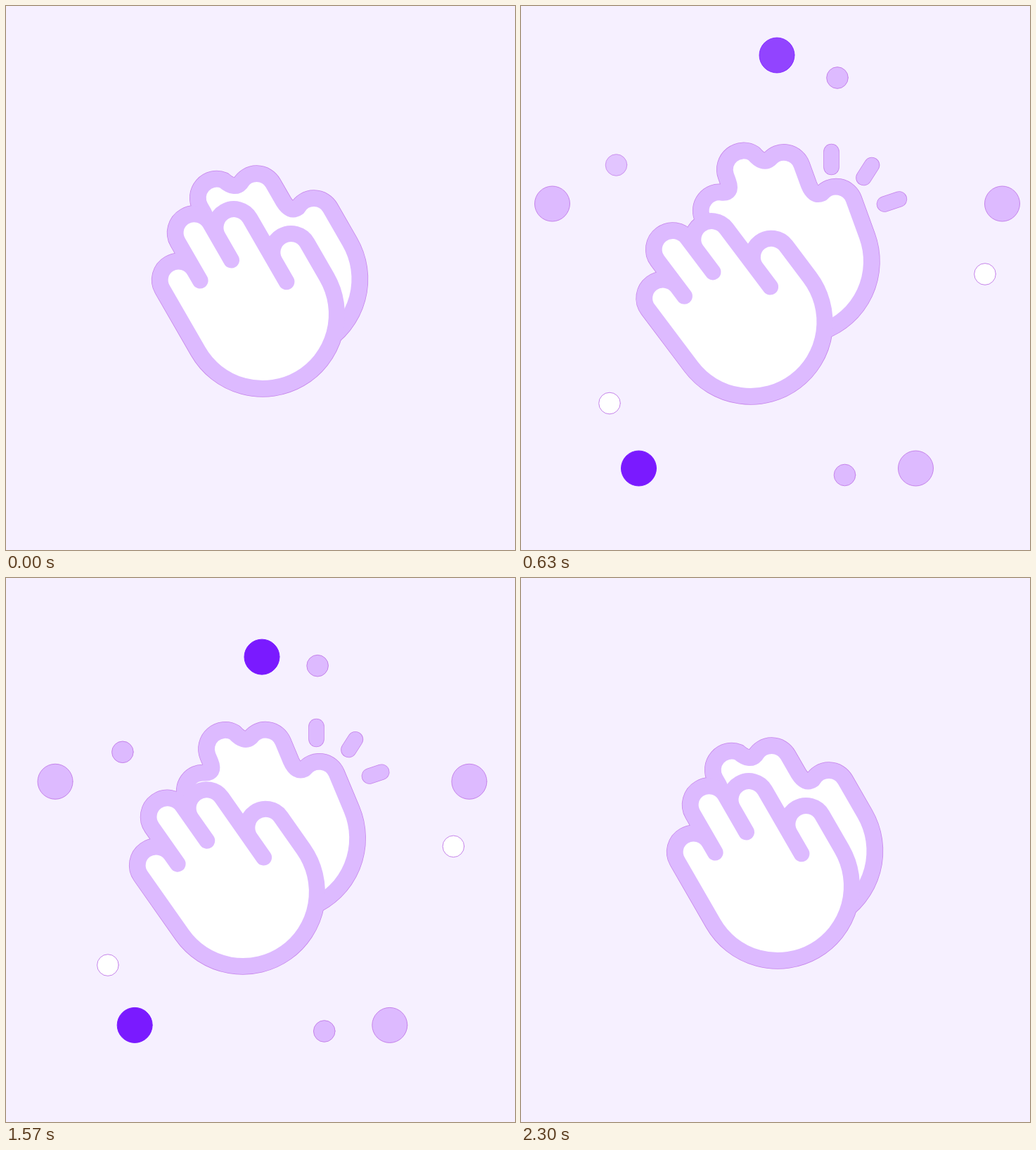
Write an HTML page with a canvas that moves like this. It is 724x773 px and loops after 2330 ms.

```html
<!DOCTYPE html>
<html lang="en">
<head>
<meta charset="utf-8">
<title>Clapping hands</title>
<style>
html, body { margin: 0; width: 100%; height: 100%; overflow: hidden; background: #f6f0ff; }
canvas { display: block; }
</style>
</head>
<body>
<canvas id="stage" width="724" height="773"></canvas>
<script>
const ctx = document.getElementById('stage').getContext('2d');
const BG = '#f6f0ff', LILAC = '#ddbaff', VIOLET = '#7a1aff', WHITE = '#fff', EDGE = '#c583ea';
const LOOP = 2330, STEP = 100 / 3, CLAP = 36;

// Hands in local space: palm centre at 0,0 and fingers pointing up.
const palm = 'L105.5 0A105.5 105.5 0 0 1 -105.5 0Z';
const frontPath = new Path2D('M-105.5 0V-102A26 26 0 0 1 -53 -102V-86V-149A26 26 0 0 1 0 -149V-89V-127' +
  'A26 26 0 0 1 52.5 -127V-23V-56A26 26 0 0 1 105.5 -56' + palm);
const backPath = new Path2D('M-105.5 0V-106A26 26 0 0 1 -68 -129Q-53.5 -122 -53.5 -140V-149' +
  'A26.5 26.5 0 0 1 -6 -165Q1 -146 13 -150A26.5 26.5 0 0 1 52.5 -127V-97Q53 -78 66 -79' +
  'A26.5 26.5 0 0 1 105.5 -56' + palm);

// x and y at the burst, x and y when spread, radius, colour, late starter
const dots = [
  [364, 156, 364, 70, 25, VIOLET, true],
  [115.5, 304, 44.5, 281, 25, LILAC],
  [613.5, 304, 684.5, 281, 25, LILAC],
  [211, 597, 167.5, 657, 25, VIOLET],
  [518, 597, 561.5, 657, 25, LILAC],
  [431, 165, 450, 102, 15.3, LILAC],
  [197.5, 269.5, 135.5, 226, 15.3, LILAC, true],
  [594.5, 382, 660, 381, 15.3, WHITE],
  [178.5, 524.5, 126, 564.5, 15.3, WHITE],
  [439, 604, 460.5, 666.5, 15.3, LILAC]
];
// inner end, outer end
const rays = [[441.5, 229, 441.5, 207], [487.5, 244, 499, 226], [517, 281.5, 538, 274.5]];

const lerp = (a, b, p) => a + (b - a) * p;
const linear = p => p;
const out = n => p => 1 - (1 - p) ** n;
const inOut = p => p * p * (3 - 2 * p);

// Keys are [time, value, easing on the way there].
function track(k, keys) {
  if (k <= keys[0][0]) return keys[0][1];
  for (let i = 1; i < keys.length; i++) {
    const [t0, v0] = keys[i - 1], [t1, v1, ease = linear] = keys[i];
    if (k <= t1) return lerp(v0, v1, ease((k - t0) / (t1 - t0)));
  }
  return keys[keys.length - 1][1];
}

function disc(x, y, r, colour) {
  ctx.beginPath();
  ctx.arc(x, y, r, 0, Math.PI * 2);
  ctx.fillStyle = colour;
  ctx.fill();
  ctx.lineWidth = 1;
  ctx.strokeStyle = colour === VIOLET ? VIOLET : EDGE;
  ctx.stroke();
}

function circle(r, width, colour) {
  ctx.beginPath();
  ctx.arc(364.5, 386, r, 0, Math.PI * 2);
  ctx.lineWidth = width;
  ctx.strokeStyle = colour;
  ctx.stroke();
}

function line([x0, y0, x1, y1], p, width, colour) {
  ctx.beginPath();
  ctx.moveTo(x0, y0);
  ctx.lineTo(lerp(x0, x1, p), lerp(y0, y1, p));
  ctx.lineWidth = width;
  ctx.strokeStyle = colour;
  ctx.stroke();
}

function hand(path, x, y, angle, edge) {
  ctx.save();
  ctx.translate(x, y);
  ctx.rotate(angle * Math.PI / 180);
  ctx.fillStyle = WHITE;
  ctx.strokeStyle = edge ? EDGE : LILAC;
  ctx.lineWidth = edge ? 24.5 : 23;
  if (!edge) ctx.fill(path);
  ctx.stroke(path);
  ctx.restore();
}

function drawRing(k) {
  if (k < 5 || k > 10) return;
  const r = track(k, [[5, 80], [10, 190.5, out(1.5)]]);
  const width = track(k, [[5, 45], [10, 2.5]]);
  circle(r, width + 1.4, '#deb0ee');
  circle(r, width - 0.4, BG);
  ctx.globalAlpha = (10 - k) / 5;
  circle(r, width, LILAC);
  ctx.globalAlpha = 1;
}

function drawDots(k) {
  if (k < 6) return;
  for (const [x0, y0, x1, y1, r, colour, late] of dots) {
    const p = track(k, [[6, -1.8], [10, 0], [11, late ? 0.51 : 0.64], [19, 1, out(1.3)], [21, 1.04, out(2)]]);
    ctx.globalAlpha = track(k, late ? [[17.5, 1], [25, 0]] : [[19, 1], [26, 0]]);
    disc(lerp(x0, x1, p), lerp(y0, y1, p), r, colour);
  }
  ctx.globalAlpha = 1;
}

function drawRays(k) {
  if (k < 8) return;
  const p = track(k, [[8, 0], [10, 0.41], [11, 0.82], [19, 1, out(2)]]);
  ctx.globalAlpha = track(k, [[19, 1], [26, 0]]);
  for (const ray of rays) {
    line(ray, p, 22.6, EDGE);
    line(ray, p, 21, LILAC);
  }
  ctx.globalAlpha = 1;
}

function drawHands(k) {
  const p = track(k, [[3, 0], [10, 0.115, q => q ** 3], [11, 0.73], [19, 1, out(2)], [33, 0, inOut]]);
  for (const edge of [true, false]) {
    hand(backPath, lerp(397.5, 393, p), lerp(388, 363, p), lerp(-30, -20, p), edge);
    hand(frontPath, lerp(365, 326.5, p), lerp(438, 449, p), lerp(-30, -37, p), edge);
  }
}

function draw(now) {
  const k = Math.floor((now % LOOP + 4) / STEP) % CLAP;
  ctx.fillStyle = BG;
  ctx.fillRect(0, 0, 724, 773);
  ctx.lineCap = ctx.lineJoin = 'round';
  drawRing(k);
  drawDots(k);
  drawRays(k);
  drawHands(k);
}

const start = performance.now();
(function tick() {
  draw(performance.now() - start);
  requestAnimationFrame(tick);
})();
</script>
</body>
</html>
```
